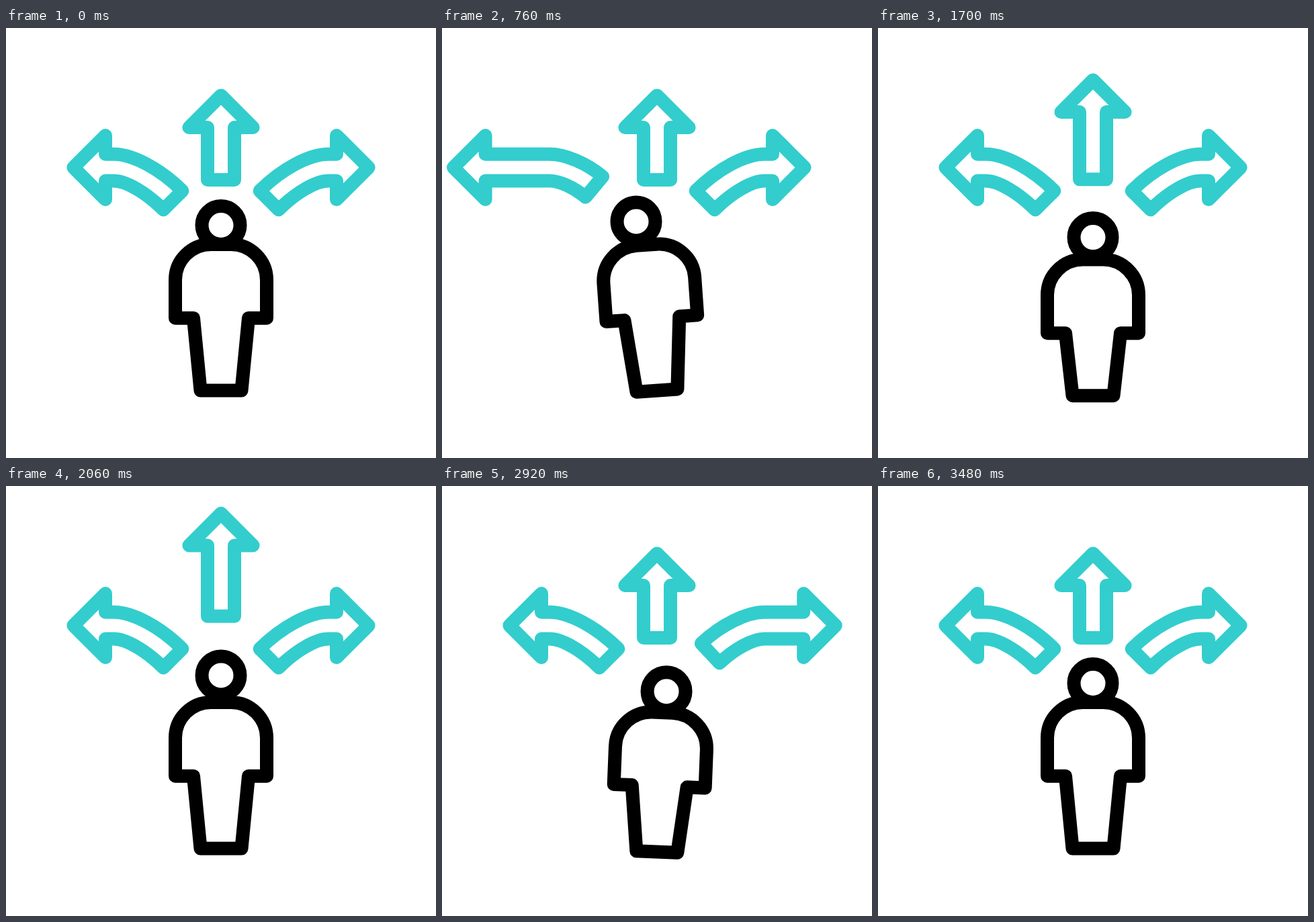
An HTML page that plays this animation: 640 px wide and 640 px high, repeating every 3600 ms.

```html
<!DOCTYPE html>
<html lang="en">
<head>
<meta charset="utf-8">
<title>Choosing a direction</title>
<style>
  html, body { margin: 0; width: 100%; height: 100%; overflow: hidden; background: #fff; }
  svg { display: block; width: 100vw; height: 100vh; }
</style>
</head>
<body>
<svg viewBox="0 0 640 640" fill="none" stroke-width="20" stroke-linecap="round" stroke-linejoin="round">
  <g stroke="#33cdcd">
    <path id="left"/>
    <path id="up"/>
    <path id="right" transform="matrix(-1 0 0 1 640 0)"/>
  </g>
  <g stroke="#000">
    <path id="body"/>
    <circle id="head" r="28.5"/>
  </g>
</svg>
<script>
const LOOP = 3600;
const el = id => document.getElementById(id);
const smooth = x => x * x * (3 - 2 * x);
const mix = (a, b, k) => a + (b - a) * k;

// Each move: start, deepest crouch, furthest reach, back at rest (ms)
const moves = [
  { name: 'left', keys: [0, 395, 780, 1163], tilt: -4.1, head: [288.8, 287.7] },
  { name: 'up', keys: [1163, 1556, 1950, 2330], tilt: 0, head: [320, 278.9] },
  { name: 'right', keys: [2330, 2726, 3096, 3480], tilt: 4.2, head: [346, 288.5] }
];

// Eased value through rest -> crouch -> reach -> rest
function pose(t, keys, rest, crouch, reach) {
  if (t <= keys[0] || t >= keys[3]) return rest;
  const stops = [rest, crouch, reach, rest];
  const i = t < keys[1] ? 0 : t < keys[2] ? 1 : 2;
  return mix(stops[i], stops[i + 1], smooth((t - keys[i]) / (keys[i + 1] - keys[i])));
}

// Bent arrow pointing left; the tail turns a little as it slides along the bend
const MID = 207.6, HALF = 19.9, NOTCH = 148, BEND = 160, ROUND = 0.6;

function bentArrow(tip, slide) {
  const turn = 0.0031 * Math.max(slide, 0);
  const angle = Math.PI / 4 - turn;
  const way = Math.PI / 4 - turn / 2;
  const cx = 248.3 - slide * Math.cos(way);
  const cy = 256.4 - slide * Math.sin(way);

  // Points of one long side, from the straight shaft to the tail
  const side = s => {
    const y0 = MID + s * HALF;
    const x = cx - s * HALF * Math.sin(angle);
    const y = cy + s * HALF * Math.cos(angle);
    const corner = x - (y - y0) / Math.tan(angle);
    return [
      `${BEND} ${y0}`,
      `${mix(BEND, corner, ROUND)} ${y0}`,
      `${mix(x, corner, ROUND)} ${mix(y, y0, ROUND)}`,
      `${x} ${y}`
    ];
  };
  const a = side(-1), b = side(1).reverse();
  const x = NOTCH - tip;
  return `M${x - 47.6} ${MID}L${x} ${MID - 47.6}V${MID - HALF}L${a[0]}C${a.slice(1).join(' ')}` +
    `L${b[0]}C${b.slice(1).join(' ')}H${x}V${MID + 47.6}Z`;
}

function upArrow(tip, slide) {
  const y = 148 - tip;
  return `M320 ${y - 47.6}L272.4 ${y}H300V${226 - slide}H340V${y}H367.6Z`;
}

function bodyPath(drop, feet) {
  const arm = 431.7 + drop, foot = 539.5 + feet, shoulder = 375 + drop;
  return `M252 ${shoulder}A53 53 0 0 1 305 ${322 + drop}H335A53 53 0 0 1 388 ${shoulder}` +
    `V${arm}H361L350.5 ${foot}H289.5L279 ${arm}H252Z`;
}

function draw(t) {
  const [l, u, r] = moves.map(m => m.keys);
  el('left').setAttribute('d', bentArrow(pose(t, l, 0, 0, 84), pose(t, l, 0, -11.8, 30)));
  el('up').setAttribute('d', upArrow(pose(t, u, 0, 0, 75), pose(t, u, 0, -17, 40.5)));
  el('right').setAttribute('d', bentArrow(pose(t, r, 0, 0, 85.5), pose(t, r, 0, -11.8, 30)));

  const m = moves.find(m => t < m.keys[3]) || moves[2];
  const at = (rest, crouch, reach) => pose(t, m.keys, rest, crouch, reach);
  el('body').setAttribute('d', bodyPath(at(0, 32.5, 0), at(0, 11, 0)));
  el('body').setAttribute('transform', `rotate(${at(0, 0, m.tilt)} 320 540)`);
  el('head').setAttribute('cx', at(320, 320, m.head[0]));
  el('head').setAttribute('cy', at(293.5, 326, m.head[1]));
}

function tick() {
  draw(performance.now() % LOOP);
  requestAnimationFrame(tick);
}
tick();
</script>
</body>
</html>
```
